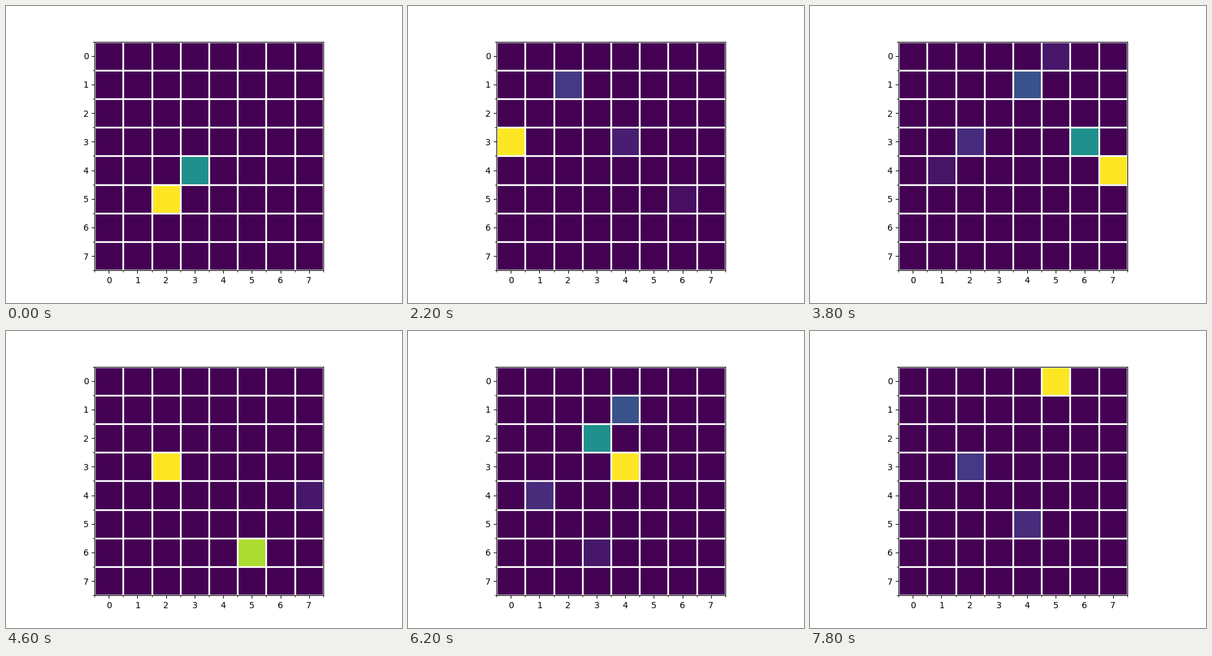
These frames come from a looping animation (640 px wide and 480 px high, 8 s). A matplotlib script:

```python
import numpy as np
import matplotlib.pyplot as plt
from matplotlib.animation import FuncAnimation

SIZE = 8
STEPS = 40
STEP_MS = 200
DECAY = 0.5
CUTOFF = 0.05
START = (4, 3)

# Step of arrival: square. The bishop rests on a square until it must leave.
STOPS = {
    0: (5, 2), 2: (6, 3), 4: (6, 5), 5: (1, 0), 7: (5, 6), 8: (3, 4),
    10: (3, 0), 12: (4, 1), 15: (0, 5), 16: (3, 2), 17: (1, 4), 18: (3, 6),
    20: (6, 5), 23: (3, 2), 27: (6, 3), 29: (1, 4), 30: (2, 3), 31: (3, 4),
    33: (7, 2), 34: (4, 5), 35: (5, 4), 38: (0, 5),
}


def corner(a, b):
    """Where the falling diagonal through a meets the rising one through b."""
    total, diff = sum(b), a[0] - a[1]
    return (total + diff) // 2, (total - diff) // 2


def walk():
    """Square at every step: rest, turn at a corner if needed, arrive."""
    path = []
    here = START
    for step, square in STOPS.items():
        path += [here] * (step - len(path))
        on_diagonal = abs(here[0] - square[0]) == abs(here[1] - square[1])
        if path and not on_diagonal:
            path[-1] = corner(here, square)
        path.append(square)
        here = square
    return path + [here] * (STEPS - len(path))


PATH = walk()


def heat(step):
    """Fading trail of all visits up to this step, scaled to a peak of 1."""
    board = np.zeros((SIZE, SIZE))
    for square in [START] + PATH[:step + 1]:
        board *= DECAY
        board[board < CUTOFF] = 0
        board[square] += 1
    return board / board.max()


fig, ax = plt.subplots(figsize=(6.4, 4.8), dpi=100)
image = ax.imshow(heat(0), cmap="viridis", vmin=0, vmax=1)

edges = np.arange(-0.5, SIZE, 1)
ax.set_xticks(range(SIZE))
ax.set_yticks(range(SIZE))
ax.set_xticks(edges, minor=True)
ax.set_yticks(edges, minor=True)
ax.grid(which="minor", color="w", linestyle="-", linewidth=2)


def update(step):
    image.set_data(heat(step))
    return [image]


anim = FuncAnimation(fig, update, frames=STEPS, interval=STEP_MS,
                     repeat=True, repeat_delay=0)
plt.show()
```
